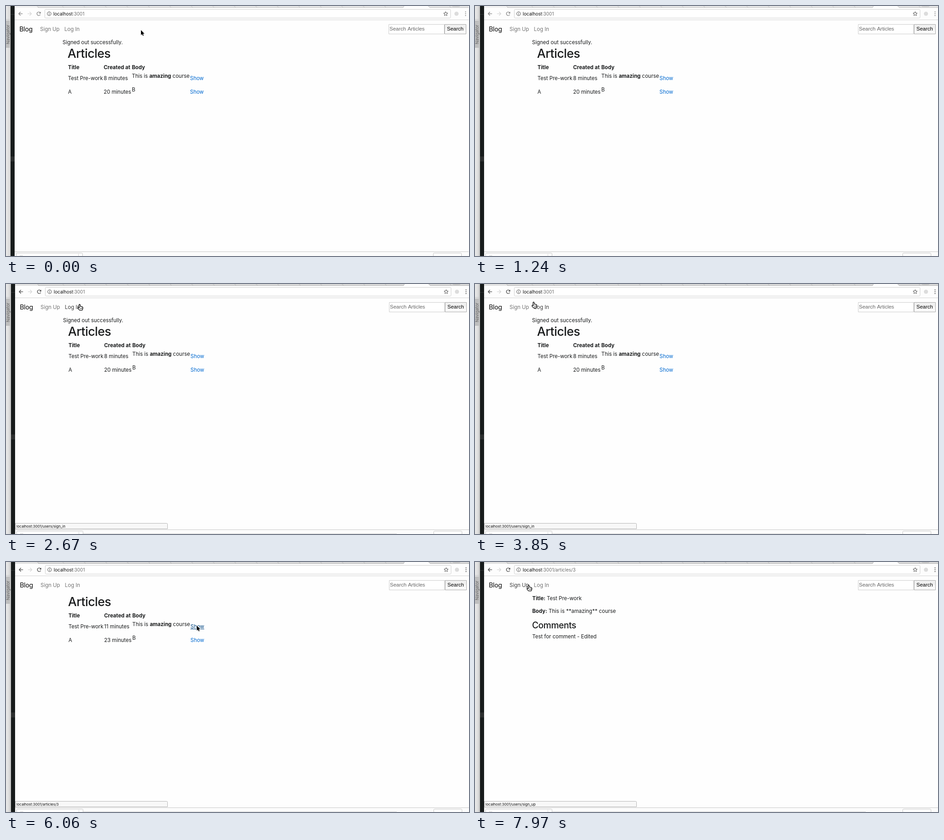
Animation, 1019 px wide and 550 px high, one loop 8 s. Source, as an HTML page with a canvas:

```html
<!DOCTYPE html>
<html lang="en">
<head>
<meta charset="utf-8">
<title>Blog</title>
<style>
  html, body { margin: 0; width: 100%; height: 100%; overflow: hidden; background: #fff; }
  canvas { display: block; }
</style>
</head>
<body>
<canvas id="stage" width="1019" height="550"></canvas>
<script>
const ctx = document.getElementById('stage').getContext('2d');
const LOOP = 8000, W = 1019, H = 550;
const UI = 'Inter, "Open Sans", sans-serif';
const FORM = '"Liberation Sans", Arial, sans-serif';
const INK = '#191b1c', HOST = 'localhost:3001';

// Pointer moves: first step, last step, number of steps, destination
const START = [297, 53];
const MOVES = [
  [140, 640, 4, 282, -25],
  [1600, 1980, 3, 215, 85],
  [2430, 2670, 3, 162, 45],
  [2820, 3110, 2, 150, 47],
  [3400, 3850, 4, 129, 40],
  [3990, 4430, 4, 43, 46],
  [4870, 5760, 7, 420, 140],
  [6510, 6660, 2, 264, 120],
  [6950, 7970, 8, 118, 51]
];
const SHIFT_AT = 940, ACTIVE_AT = 1450, RELOAD_AT = 4730;
const CLICK_AT = 6060, ARTICLE_AT = 6210, LEAVE_AT = 6950;

// Hover areas: left, top, right, bottom
const AREAS = {
  blog: [30, 36, 60, 66],
  signUp: [71, 35, 124, 66],
  logIn: [124, 35, 169, 66],
  show: [405, 134, 436, 149]
};
const PATHS = { blog: '', signUp: '/users/sign_up', logIn: '/users/sign_in', show: '/articles/3' };

function pointerAt(t) {
  let [x, y] = START;
  for (const [from, to, n, tx, ty] of MOVES) {
    if (t < from) break;
    const gap = (to - from) / (n - 1);
    const k = Math.min(n, Math.floor((t - from) / gap + 1e-6) + 1) / n;
    x += (tx - x) * k;
    y += (ty - y) * k;
  }
  return [x, y];
}

function targetAt(t, x, y) {
  if (t >= CLICK_AT && t < LEAVE_AT) return 'show';
  for (const name in AREAS) {
    const [l, top, r, b] = AREAS[name];
    if (name === 'show' && (t < RELOAD_AT || t >= ARTICLE_AT)) continue;
    if (x >= l && x < r && y >= top && y < b) return name;
  }
  return null;
}

function text(s, x, y, { size = 11.5, weight = 400, color = INK, family = UI, track = 0 } = {}) {
  ctx.font = `${weight} ${size}px ${family}`;
  ctx.letterSpacing = `${track * size}px`;
  ctx.fillStyle = color;
  ctx.fillText(s, x, y);
  return x + ctx.measureText(s).width;
}

function bold(s, x, y) {
  return text(s, x, y, { weight: 700 });
}

function rect(x, y, w, h, color) {
  ctx.fillStyle = color;
  ctx.fillRect(x, y, w, h);
}

function box(x, y, w, h, fill, stroke, radius = 0) {
  ctx.beginPath();
  ctx.roundRect(x + 0.5, y + 0.5, w - 1, h - 1, radius);
  ctx.fillStyle = fill;
  ctx.fill();
  ctx.strokeStyle = stroke;
  ctx.lineWidth = 1;
  ctx.stroke();
}

function trace(points, x = 0, y = 0) {
  ctx.beginPath();
  for (let i = 0; i < points.length; i += 2) ctx.lineTo(x + points[i], y + points[i + 1]);
}

function line(points, color, width = 1) {
  trace(points);
  ctx.strokeStyle = color;
  ctx.lineWidth = width;
  ctx.stroke();
}

function circle(x, y, r, color, filled) {
  ctx.beginPath();
  ctx.arc(x, y, r, 0, 7);
  ctx.fillStyle = ctx.strokeStyle = color;
  ctx.lineWidth = 1;
  filled ? ctx.fill() : ctx.stroke();
}

function drawSidePanel() {
  const shade = ctx.createLinearGradient(0, 0, 11, 0);
  shade.addColorStop(0, '#e9e9e9');
  shade.addColorStop(0.5, '#e0e0e0');
  shade.addColorStop(1, '#c6c6c6');
  rect(0, 0, 11, H, shade);
  rect(0, 29, 9, 1, '#c4c4c4');
  rect(0, 32, 9, 60, '#bfbfbf');
  ctx.save();
  ctx.translate(8, 84);
  ctx.rotate(-Math.PI / 2);
  text('Navigator', 0, 0, { size: 9.4, color: '#646464' });
  ctx.restore();
}

function drawTabs(active) {
  const fill = active ? '#d9d9d9' : '#e6e6e6', edge = active ? '#b4b4b4' : '#c2c2c2';
  rect(20, 0, W - 20, 3, fill);
  rect(20, 3, W - 20, 1, edge);
  rect(20, 0, 51, 4, active ? '#e2e2e2' : '#f2f2f2');
  for (let i = 0; i <= 16; i++) {
    const x = i ? 79 + 47.3 * i : 71;
    line([x - 2, 0, x + 2, 3.5], edge);
  }
  trace([877, 0, 875, 4, 934, 4, 930, 0]);
  ctx.fillStyle = '#fdfdfd';
  ctx.fill();
  line([877, 0, 875, 3.5], edge);
  line([930, 0, 934, 3.5], edge);
  line([977, 0, 980, 3.5], edge);
  box(983, -6, 17, 8, active ? '#cfcfcf' : '#e0e0e0', edge, 2);
}

function arrowIcon(x, dir, color) {
  line([x - 4 * dir, 17, x + 4.5 * dir, 17], color, 1.2);
  line([x, 13, x - 4 * dir, 17, x, 21], color, 1.2);
}

function drawStar(x, y) {
  ctx.beginPath();
  for (let i = 0; i < 10; i++) {
    const a = -Math.PI / 2 + i * Math.PI / 5, r = i % 2 ? 2.2 : 4.8;
    ctx.lineTo(x + r * Math.cos(a), y + r * Math.sin(a));
  }
  ctx.closePath();
  ctx.strokeStyle = '#4c4c4c';
  ctx.lineWidth = 1;
  ctx.stroke();
}

function drawToolbar(active, path) {
  const dark = active ? '#444' : '#808080';
  rect(20, 4, W - 20, 26, '#fdfdfd');
  drawTabs(active);
  rect(20, 30, W - 20, 1, '#d2d2d2');
  arrowIcon(33, 1, dark);
  arrowIcon(53, -1, '#d4d4d4');

  ctx.beginPath();
  ctx.arc(73, 17, 3.9, 0.5, 5.5);
  ctx.strokeStyle = dark;
  ctx.lineWidth = 1.3;
  ctx.stroke();
  trace([77.5, 12.6, 77.5, 16.6, 73.5, 16.6]);
  ctx.fillStyle = dark;
  ctx.fill();

  box(86, 7, 894, 20, '#fff', '#cfcfcf', 2);
  circle(96, 17, 4.2, '#4c4c4c');
  rect(95.5, 16.3, 1.1, 3.2, '#4c4c4c');
  rect(95.5, 14.4, 1.1, 1.1, '#4c4c4c');
  const x = text('localhost', 105, 20.8, { size: 10, color: '#0c0c0c' });
  text(':3001' + path, x, 20.8, { size: 10, color: '#686868' });

  drawStar(968.7, 17.2);
  circle(992.5, 17, 4.6, '#dcdcdc', true);
  for (const y of [13, 17, 21]) circle(1012.5, y, 1.1, dark, true);
}

function drawNav(target) {
  const link = name => ({ color: target === name ? '#3c3c3c' : '#747474' });
  text('Blog', 30.6, 56, { size: 14.2, color: '#060606', track: -0.02 });
  text('Sign Up', 76, 55, link('signUp'));
  text('Log In', 129.5, 55, link('logIn'));

  box(843, 40, 123, 22, '#fff', '#cccccc');
  text('Search Articles', 845, 54, { size: 11.5, color: '#666', family: FORM });
  box(966, 40, 48, 22, '#f8f8f8', '#a9a9a9');
  rect(967, 41, 46, 9, '#f0f0f0');
  text('Search', 971.5, 54, { size: 11.5, color: '#000', family: FORM });
}

function showLink(y, hovered) {
  const color = hovered ? '#014682' : '#0069d0';
  const end = text('Show', 406, y, { color });
  if (hovered) rect(406, y + 1, end - 406, 1, color);
}

function drawList(reloaded, target) {
  ctx.save();
  if (reloaded) ctx.translate(0, -17);
  else text('Signed out successfully.', 125.5, 83.6);
  text('Articles', 136.6, 114, { size: 27, weight: 500, track: -0.02 });
  bold('Title', 137.5, 139);
  bold('Created at', 216, 139);
  bold('Body', 278, 139);

  text('Test Pre-work', 137.5, 163);
  text(reloaded ? '11 minutes' : '8 minutes', 216, 163);
  let x = text('This is ', 278, 157.6);
  x = bold('amazing', x, 157.6);
  text(' course', x, 157.6);
  showLink(163, target === 'show');

  text('A', 137.5, 193);
  text(reloaded ? '23 minutes' : '20 minutes', 216, 193);
  text('B', 278, 187.6);
  showLink(193, false);
  ctx.restore();
}

function drawArticle() {
  text(' Test Pre-work', bold('Title:', 126, 83.6), 83.6);
  text(' This is **amazing** course', bold('Body:', 126, 112.4), 112.4);
  text('Comments', 125.4, 146, { size: 19.4, weight: 500, track: -0.02 });
  text('Test for comment - Edited', 126, 168);
}

function drawBottom(active, target) {
  rect(20, 540, W - 20, 1, '#c8c8c8');
  rect(20, 541, W - 20, 9, '#fcfcfc');
  box(23, 543, 147, 16, '#fff', '#c4c4c4', 2);
  rect(160, 545, 1, 5, '#d6d6d6');
  rect(31, 549, 7, 1, '#cfcfcf');
  box(941, 543, 63, 16, '#fff', '#c4c4c4', 2);
  if (active) rect(170, 549, 690, 1, '#d4d4d4');
  if (target) {
    box(20, 526, 336, 13, '#f8f8f8', '#b4b4b4', [0, 2, 0, 0]);
    text(HOST + PATHS[target], 23, 535.8, { size: 8, color: '#0c0c0c' });
  }
}

const ARROW = [0, 0, 0, 11, 2.5, 8.7, 4.2, 12.6, 6, 11.8, 4.4, 8, 7.7, 8];
const HAND = [-1.3, 1, -0.6, 0, 0.5, 0, 1.2, 1, 1.6, 4.6, 3, 4.4, 4.8, 5, 6.4, 5.6,
  7, 7, 6.6, 10, 5.6, 12.5, 0, 12.5, -3.5, 8.5, -3.2, 7, -1.9, 7, -0.6, 8.2];

function drawPointer(x, y, hand) {
  trace(hand ? HAND : ARROW, x, y);
  ctx.closePath();
  ctx.lineJoin = 'round';
  ctx.lineWidth = 1.6;
  ctx.strokeStyle = hand ? '#000' : '#fff';
  ctx.fillStyle = hand ? '#fff' : '#000';
  ctx.stroke();
  ctx.fill();
  if (hand) {
    ctx.lineWidth = 1;
    ctx.stroke();
    for (const dx of [1.8, 3.4, 5]) line([x + dx, y + 7.5, x + dx, y + 10], '#111', 0.8);
  }
}

function draw(t) {
  const [x, y] = pointerAt(t);
  const target = targetAt(t, x, y);
  const active = t >= ACTIVE_AT, article = t >= ARTICLE_AT;
  const waiting = t >= CLICK_AT && t < LEAVE_AT;

  rect(0, 0, W, H, '#fefefe');
  drawSidePanel();
  ctx.save();
  if (t < SHIFT_AT) ctx.translate(-1, 0);
  rect(11, 0, 9, H, '#171b1b');
  rect(11, 18, 9, 1, '#303434');
  rect(11, 331, 9, 11, '#2b2e2e');
  drawToolbar(active, article ? '/articles/3' : '');
  drawNav(target);
  if (article) drawArticle();
  else drawList(t >= RELOAD_AT, target);
  drawBottom(active, target);
  ctx.restore();
  drawPointer(x, y, target && !waiting);
}

const began = performance.now();
function tick() {
  draw((performance.now() - began) % LOOP);
  requestAnimationFrame(tick);
}
tick();
</script>
</body>
</html>
```
